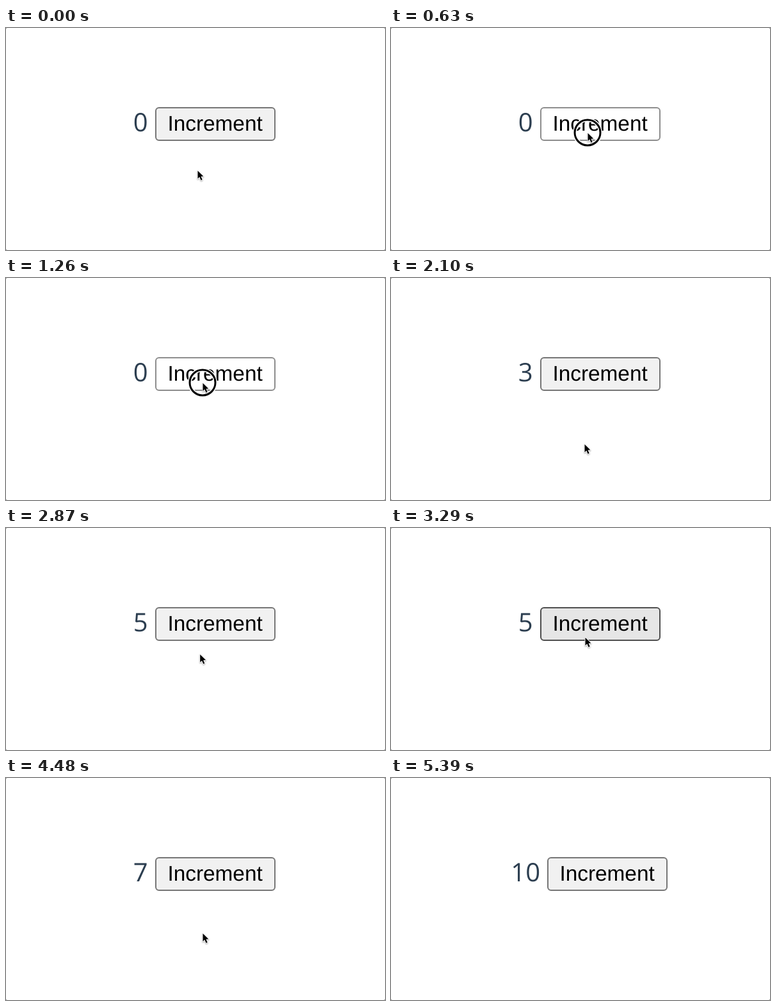
Animation of 592 by 348 pixels, one loop 5740 ms. Source, as an HTML page with a canvas:

```html
<!DOCTYPE html>
<html lang="en">
<head>
<meta charset="utf-8">
<title>Delayed counter</title>
<style>
  html, body { margin: 0; width: 100%; height: 100%; overflow: hidden; background: #fff; }
  canvas { display: block; width: 592px; height: 348px; }
</style>
</head>
<body>
<canvas id="stage" width="592" height="348"></canvas>
<script>
const ctx = document.getElementById('stage').getContext('2d');
const LOOP = 5740;
const TICK = 70;
const DELAY = 1138; // from a click to its count

// Two bursts of five evenly spaced clicks
const bursts = [{ first: 616, gap: 144 }, { first: 3180, gap: 161 }];
for (const burst of bursts) {
  burst.clicks = Array.from({ length: 5 }, (_, i) => burst.first + i * burst.gap);
}
const clicks = bursts.flatMap(burst => burst.clicks);

const home = { x: 299, y: 223 };
const moves = [
  { from: 0, to: 210, x: 307, y: 164 },
  { from: 1330, to: 1540, x: 302, y: 260 },
  { from: 2730, to: 3150, x: 303, y: 171 },
  { from: 3920, to: 4060, x: 307, y: 243 },
  { from: 5110, to: 5320, x: 302, y: 288 }
];
const POINTER_GONE = 5390;

const looks = {
  idle: { face: '#f1f1f1', edge: '#767676' },
  hover: { face: '#e6e6e6', edge: '#4f4f4f' },
  active: { face: '#fff', edge: '#8d8d8d' }
};

const easeOut = p => 1 - (1 - p) ** 3;

function pointerAt(t) {
  let { x, y } = home;
  for (const move of moves) {
    const p = Math.min(1, Math.max(0, (t - move.from) / (move.to - move.from)));
    x += (move.x - x) * easeOut(p);
    y += (move.y - y) * easeOut(p);
  }
  return { x, y };
}

function roundRect(x, y, w, h, r) {
  ctx.beginPath();
  ctx.roundRect(x, y, w, h, r);
}

function drawWindow() {
  ctx.fillStyle = '#777';
  ctx.fillRect(0, 0, 592, 348);
  ctx.fillStyle = '#fff';
  roundRect(0, 0, 592, 348, 2);
  ctx.fill();
}

function drawCount(n) {
  ctx.font = '40px "Open Sans", "Noto Sans", sans-serif';
  ctx.textAlign = 'center';
  ctx.fillStyle = '#2c3e50';
  ctx.fillText(n, 210.2, 161.5);
}

function drawButton(x, look) {
  roundRect(x + 1, 125, 186, 51, 5);
  ctx.fillStyle = look.face;
  ctx.fill();
  ctx.strokeStyle = look.edge;
  ctx.lineWidth = 2;
  ctx.stroke();
  ctx.font = '33.33px "Liberation Sans", Arial, sans-serif';
  ctx.textAlign = 'left';
  ctx.fillStyle = '#000';
  ctx.fillText('Increment', x + 19.5, 161);
}

function drawRing(x, y) {
  ctx.beginPath();
  ctx.arc(x, y, 20, 0, Math.PI * 2);
  for (const [width, color] of [[6, '#fff'], [3, '#000']]) {
    ctx.lineWidth = width;
    ctx.strokeStyle = color;
    ctx.stroke();
  }
}

function drawPointer(x, y) {
  ctx.save();
  ctx.translate(x, y);
  ctx.beginPath();
  ctx.moveTo(0.5, 0.8);
  ctx.lineTo(0.5, 13.2);
  ctx.lineTo(3.3, 10.6);
  ctx.lineTo(5.5, 15.7);
  ctx.lineTo(7.7, 14.8);
  ctx.lineTo(5.5, 9.8);
  ctx.lineTo(9.4, 9.6);
  ctx.closePath();
  ctx.lineJoin = 'round';
  ctx.lineWidth = 2;
  ctx.strokeStyle = '#fff';
  ctx.shadowColor = 'rgba(0,0,0,0.35)';
  ctx.shadowBlur = 2;
  ctx.shadowOffsetY = 1;
  ctx.stroke();
  ctx.shadowColor = 'transparent';
  ctx.fillStyle = '#000';
  ctx.fill();
  ctx.restore();
}

function draw(t) {
  const count = clicks.filter(at => at + DELAY <= t).length;
  const pressed = clicks.some(at => at <= t && t < at + TICK);
  const hovered = bursts.some(b => t >= b.first - 100 && t < b.clicks.at(-1) + 166);
  const { x, y } = pointerAt(t);

  drawWindow();
  drawCount(count);
  drawButton(count > 9 ? 244 : 233, pressed ? looks.active : hovered ? looks.hover : looks.idle);
  if (pressed) drawRing(x, y);
  if (t < POINTER_GONE) drawPointer(x, y);
}

ctx.textRendering = 'geometricPrecision';
const start = performance.now();
function loop() {
  const t = (performance.now() - start) % LOOP;
  draw(Math.floor(t / TICK) * TICK);
  requestAnimationFrame(loop);
}
loop();
</script>
</body>
</html>
```
